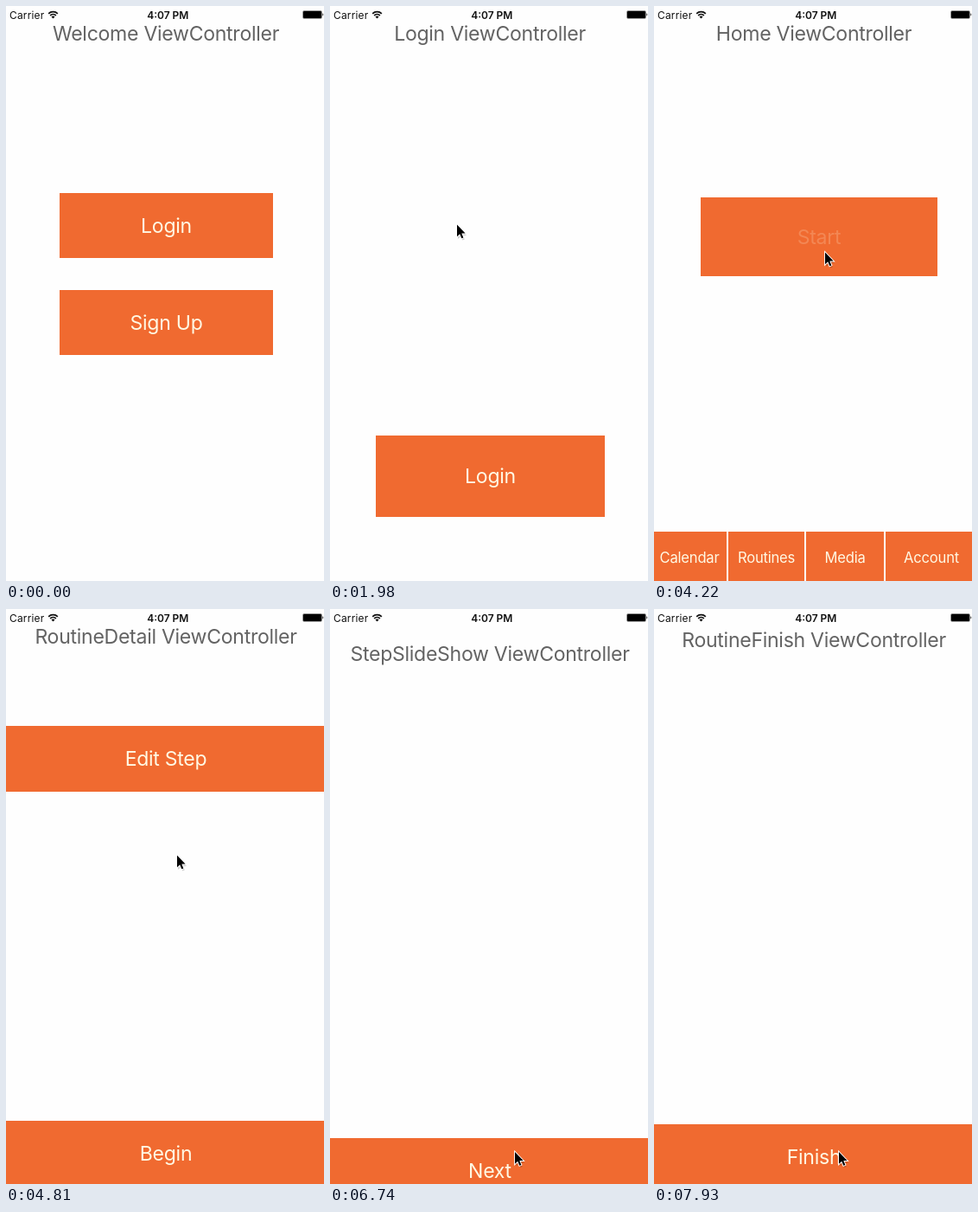
Write an HTML page that moves like this. It is 368x664 px and loops after 8 s.

```html
<!DOCTYPE html>
<html lang="en">
<head>
<meta charset="utf-8">
<title>App screens</title>
<style>
  html, body { margin: 0; width: 100%; height: 100%; overflow: hidden; background: #fefefe; }
  svg { position: fixed; inset: 0; width: 100%; height: 100%; }
  text { font-family: Inter, Roboto, sans-serif; font-optical-sizing: none; }
  .title, .label { font-size: 23.1px; letter-spacing: -.013em; text-anchor: middle; }
  .title { fill: #636363; }
  .label { fill: #fff9e4; }
  .tab { font-size: 16.6px; }
  .status { font-size: 12px; fill: #111; }
</style>
</head>
<body>
<svg viewBox="0 0 368 664">
  <g id="pages"></g>
  <g id="bar">
    <text class="status" x="4" y="14.5" letter-spacing=".15">Carrier</text>
    <g fill="none" stroke="#111" stroke-width="1.8">
      <path d="M49.2 8.9A7.5 7.5 0 0 1 59.8 8.9"/>
      <path d="M51.2 11A4.7 4.7 0 0 1 57.8 11"/>
    </g>
    <path d="M54.5 14.6L52.5 12.6A2.8 2.8 0 0 1 56.5 12.6Z" fill="#111"/>
    <text class="status" x="187.3" y="14.5" text-anchor="middle" font-weight="600">4:07 PM</text>
    <rect x="343.5" y="5.5" width="22" height="9" rx="1.5" fill="#fefefe" stroke="#999"/>
    <rect x="344" y="6" width="21" height="8" rx=".8"/>
    <path d="M366.3 8.3q2 1.7 0 3.4z" fill="#222"/>
  </g>
  <g id="cursor">
    <path d="M1 2V16.5L4.4 13.4 6.4 18 8.8 17 6.8 12.6H11Z" fill="#000" opacity=".18"/>
    <path d="M0 0V13.8L3.2 10.8 5.3 15.8 7.4 14.9 5.3 10.1H9.6Z" fill="#000" stroke="#fff" stroke-width="1.8" paint-order="stroke"/>
  </g>
</svg>
<script>
const LOOP = 8000, HEIGHT = 664, ORANGE = '#f06a30';
const SPRING = 19.2, SETTLE = 0.48;

// Each button: text, x, y, width, height
const bottom = text => [text, 0, 591, 370, 76];
const screens = [
  { title: 'Welcome', start: -1000, press: 1090,
    buttons: [['Login', 62, 216, 247, 75], ['Sign Up', 62, 328, 247, 75]] },
  { title: 'Login', start: 1180, press: 2400,
    buttons: [['Login', 53, 496, 265, 94]] },
  { title: 'Home', start: 2526, press: 4200,
    buttons: [['Start', 54, 221, 274, 91]],
    tabs: [['Calendar', -2, 607, 86, 60], ['Routines', 86, 607, 88, 60],
           ['Media', 176, 607, 90, 60], ['Account', 268, 607, 106, 60]] },
  { title: 'RoutineDetail', start: 4316, press: 6430,
    buttons: [bottom('Begin'), ['Edit Step', 0, 135, 370, 76]] },
  { title: 'StepSlideShow', start: 6461, press: 7480,
    buttons: [bottom('Next')] },
  { title: 'RoutineFinish', start: 7554, press: LOOP,
    buttons: [bottom('Finish')] }
];

// Pointer stops: time, x, y
const stops = [
  [500, 358, 313], [650, 175, 236], [1680, 175, 236], [1980, 147, 252.5],
  [2270, 214, 570.5], [3480, 214, 570.5], [4070, 198, 284.5],
  [5430, 198, 284.5], [6300, 214, 627]
];

// The screen refreshes in bursts: first time, last time, count
const bursts = [[500, 650, 2], [1090, 1680, 5], [1980, 3020, 8],
                [3620, 4810, 9], [5560, 7040, 11], [7490, 7930, 4]];
const ticks = [0];
for (const [first, last, n] of bursts)
  for (let k = 0; k < n; k++)
    ticks.push(Math.floor((first + (last - first) * k / (n - 1)) / 10) * 10);

const clamp = v => Math.max(0, Math.min(1, v));
const smooth = v => v * v * (3 - 2 * v);

function add(parent, tag, attrs, text) {
  const el = document.createElementNS('http://www.w3.org/2000/svg', tag);
  for (const key in attrs) el.setAttribute(key, attrs[key]);
  if (text) el.textContent = text;
  return parent.appendChild(el);
}

function addButton(parent, [text, x, y, width, height], tab) {
  add(parent, 'rect', { x, y, width, height, fill: ORANGE });
  return add(parent, 'text', {
    class: tab ? 'label tab' : 'label',
    x: x + width / 2,
    y: y + height / 2 + (tab ? 6 : 8)
  }, text);
}

const pages = document.getElementById('pages');
const cursor = document.getElementById('cursor');
for (const s of screens) {
  s.el = add(pages, 'g', {});
  add(s.el, 'rect', { width: 368, height: HEIGHT + 10, fill: '#fefefe' });
  add(s.el, 'text', { class: 'title', x: 185, y: 40 }, s.title + ' ViewController');
  s.label = s.buttons.map(b => addButton(s.el, b))[0];
  (s.tabs || []).forEach(b => addButton(s.el, b, true));
}

// Critically damped slide from the bottom edge
function slide(ms) {
  const t = ms / 1000, u = SPRING * t;
  if (t <= 0) return HEIGHT;
  return t > SETTLE ? 0 : Math.round(HEIGHT * (1 + u) * Math.exp(-u));
}

function pointer(t) {
  const i = stops.findIndex(s => s[0] > t);
  if (i < 0) return stops[stops.length - 1].slice(1);
  const a = stops[i - 1], b = stops[i];
  const k = smooth((t - a[0]) / (b[0] - a[0]));
  return [a[1] + (b[1] - a[1]) * k, a[2] + (b[2] - a[2]) * k];
}

function draw(time) {
  const t = ticks.filter(tick => tick <= time).pop();
  screens.forEach((s, i) => {
    const offset = slide(t - s.start);
    const next = screens[i + 1];
    s.el.setAttribute('transform', `translate(0 ${offset})`);
    s.el.setAttribute('visibility', offset < HEIGHT ? 'visible' : 'hidden');
    const dimmed = next && t >= s.press;
    s.label.setAttribute('opacity', dimmed ? 0.2 + 0.8 * clamp((t - next.start) / 250) : 1);
  });
  const shown = t >= stops[0][0];
  cursor.setAttribute('visibility', shown ? 'visible' : 'hidden');
  if (shown) cursor.setAttribute('transform', `translate(${pointer(t)})`);
}

let origin;
function frame(now) {
  origin ??= now;
  draw((now - origin) % LOOP);
  requestAnimationFrame(frame);
}
draw(0);
requestAnimationFrame(frame);
</script>
</body>
</html>
```
